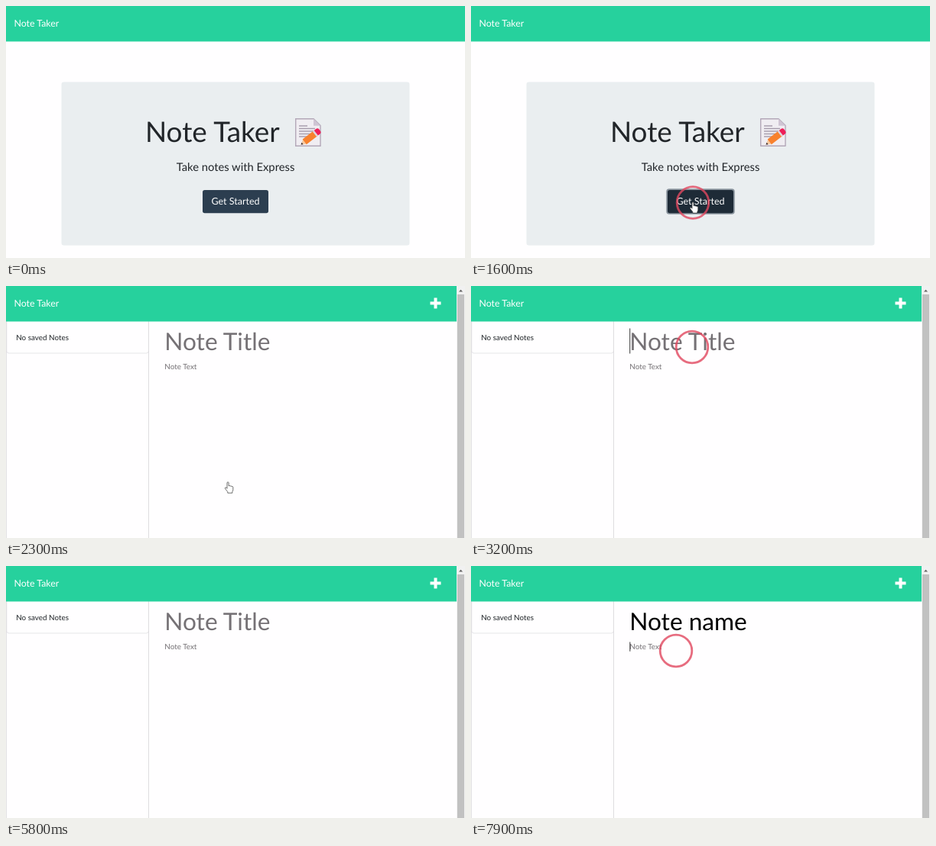
Write an HTML page with a canvas that moves like this. It is 600x330 px and loops after 8000 ms.

```html
<!DOCTYPE html>
<html lang="en">
<head>
<meta charset="utf-8">
<title>Note Taker</title>
<style>
  html, body { margin: 0; width: 100%; height: 100%; overflow: hidden; background: #fffeff; }
  canvas { display: block; width: 600px; height: 330px; }
</style>
</head>
<body>
<canvas id="stage"></canvas>
<script>
const W = 600, H = 330, LOOP = 8000;
const canvas = document.getElementById('stage');
const ctx = canvas.getContext('2d');
const dpr = window.devicePixelRatio || 1;
canvas.width = W * dpr;
canvas.height = H * dpr;

const GREEN = '#26d19d', PAPER = '#fffeff', INK = '#212529', HINT = '#757175';
const NAV_H = 46.5;
const TITLE = { x: 207.3, y: 83.5, size: 31.65 };
const TYPED = 'Note name';
const KEY_TIMES = [5900, 6100, 6200, 6400, 6600, 6700, 6900, 7000, 7100];
const CLICKS = [
  { t: 1500, x: 290, y: 257.5 },
  { t: 3100, x: 289, y: 80 },
  { t: 7800, x: 268, y: 111 }
];
const CARET_ON = [[3100, 3700], [4200, 4700], [5300, 5800], [5900, 7600]];

function rect(x, y, w, h, fill) {
  ctx.fillStyle = fill;
  ctx.fillRect(x, y, w, h);
}

function roundRect(x, y, w, h, r, fill) {
  ctx.beginPath();
  ctx.roundRect(x, y, w, h, r);
  ctx.fillStyle = fill;
  ctx.fill();
}

function poly(points, fill) {
  ctx.beginPath();
  points.forEach(([x, y]) => ctx.lineTo(x, y));
  ctx.closePath();
  ctx.fillStyle = fill;
  ctx.fill();
}

function setFont(size) {
  ctx.font = `400 ${size}px Lato, sans-serif`;
  ctx.textRendering = 'geometricPrecision';
}

function text(str, x, y, size, color, align = 'left') {
  setFont(size);
  ctx.textAlign = align;
  ctx.fillStyle = color;
  ctx.fillText(str, x, y);
}

function drawNav(width) {
  rect(0, 0, width, NAV_H, GREEN);
  text('Note Taker', 10.4, 27.2, 12.36, '#fff');
}

function drawMemo() {
  const sheet = new Path2D('M378.7 147.7H402L411 156.5V183.3H378.7Z');
  ctx.fillStyle = '#f0edf2';
  ctx.fill(sheet);
  ctx.strokeStyle = '#b3a7b8';
  ctx.lineWidth = 1.4;
  ctx.stroke(sheet);
  poly([[402, 147.7], [411, 156.7], [402, 156.7]], '#cfc5d4');

  [[160.5, 404], [164, 402], [167.5, 398], [171, 394]].forEach(([y, end]) =>
    rect(383, y - .7, end - 383, 1.4, '#a59aab'));
  rect(383, 156.3, 11, 1.4, '#a59aab');

  ctx.save();
  ctx.translate(385.5, 181.5);
  ctx.rotate(-Math.atan2(18.5, 24));
  poly([[0, 0], [7, -4.2], [7, 4.2]], '#f6c9a0');
  poly([[0, 0], [2.6, -1.6], [2.6, 1.6]], '#35272b');
  rect(6, -4.2, 18, 8.4, '#f8812e');
  rect(22.5, -4.2, 2.6, 8.4, '#ded5de');
  roundRect(25, -4.2, 6, 8.4, [0, 3, 3, 0], '#ee1f58');
  ctx.restore();
}

function drawButton(t) {
  const hover = t >= 1400, focus = t >= 1500;
  if (focus) roundRect(255.2, 239.2, 89.6, 33.6, 4, 'rgba(76,91,106,.62)');
  roundRect(257, 241, 86, 30.3, 2.8, hover ? '#1e2b37' : '#2c3e50');
  text('Get Started', 300, 260.4, 12.5, '#fff', 'center');
}

function drawHome(t) {
  drawNav(W);
  roundRect(72.5, 99.5, 455, 214, 3, '#eaeef0');
  text('Note Taker', 182, 178.3, 36.9, INK);
  drawMemo();
  text('Take notes with Express', 300, 216, 14.75, INK, 'center');
  drawButton(t);
}

function drawScrollbar() {
  rect(589, 0, 11, H, '#f1f1f1');
  rect(590, 11, 9, H - 11, '#c1c1c1');
  poly([[592, 7.5], [594.5, 4.8], [597, 7.5]], '#606060');
}

function drawSidebar() {
  rect(0, NAV_H, 1, H, '#e3e1e4');
  rect(186, NAV_H, 1, H, '#dedde0');
  ctx.beginPath();
  ctx.roundRect(.8, 45, 185.6, 43, [0, 0, 3, 3]);
  ctx.strokeStyle = '#dfdfe1';
  ctx.lineWidth = .8;
  ctx.stroke();
  text('No saved Notes', 13.2, 71.3, 9.89, INK);
}

function drawTitle(t) {
  const value = TYPED.slice(0, KEY_TIMES.filter(k => t >= k).length);
  text(value || 'Note Title', TITLE.x, TITLE.y, TITLE.size, value ? '#000' : HINT);
  if (CARET_ON.some(([on, off]) => t >= on && t < off)) {
    const x = TITLE.x + (value ? ctx.measureText(value).width : 0);
    rect(x, 55.5, .9, 33, '#222');
  }
}

function drawNotes(t) {
  drawSidebar();
  drawNav(589);
  rect(554.5, 20.5, 14, 4, '#fff');
  rect(559.5, 15.5, 4, 14, '#fff');
  drawScrollbar();
  drawTitle(t);
  text('Note Text', TITLE.x, 109.3, 9.89, HINT);
  if (t >= 7800) rect(207.4, 99.5, .9, 12.3, '#222');
}

function drawHand() {
  const hand = new Path2D('M289 257.4q1.1-1.4 2.1 0v4.4q1.2-1 2 .3 1.2-.8 1.9.5 1.6-.6 1.8 1v3.2q0 1.5-1 2.6v1.7h-6v-1.5l-3.2-4.1q-.8-1.4.4-1.7.9-.2 2 1.4Z');
  ctx.fillStyle = '#fff';
  ctx.fill(hand);
  ctx.strokeStyle = '#333';
  ctx.lineWidth = .7;
  ctx.lineJoin = 'round';
  ctx.stroke(hand);
}

function drawClick({ t: start, x, y }, t) {
  const age = t - start;
  if (age < 0 || age >= 500) return;
  const grow = Math.min(1, age / 100);
  const fade = Math.min(1, (500 - age) / 350);
  ctx.beginPath();
  ctx.arc(x, y, 14 + 6.8 * grow, 0, Math.PI * 2);
  ctx.strokeStyle = `rgba(226,72,96,${.8 * fade})`;
  ctx.lineWidth = 2.8;
  ctx.stroke();
}

function draw(t) {
  ctx.setTransform(dpr, 0, 0, dpr, 0, 0);
  rect(0, 0, W, H, PAPER);
  if (t < 2300) drawHome(t);
  else drawNotes(t);
  if (t >= 1400 && t < 2400) drawHand();
  CLICKS.forEach(click => drawClick(click, t));
}

const began = performance.now();
function tick() {
  const t = (performance.now() - began) % LOOP;
  draw(Math.floor(t / 100) * 100);
  requestAnimationFrame(tick);
}
tick();
</script>
</body>
</html>
```
